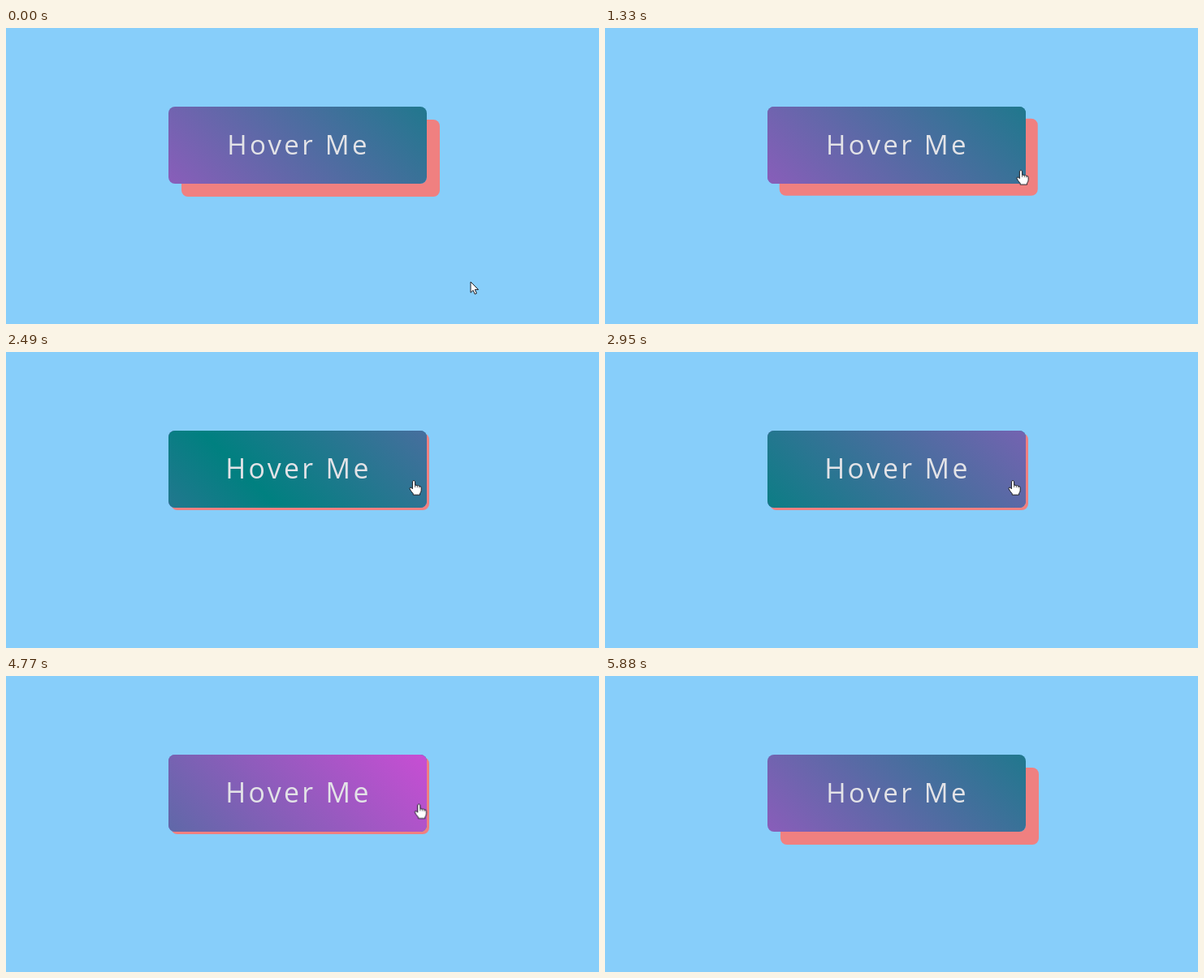
An HTML page for the animation above (7.03 s loop, 730 px wide and 365 px high).

```html
<!DOCTYPE html>
<html lang="en">
<head>
<meta charset="utf-8">
<title>Hover button</title>
<style>
  :root { --loop: 7.03s; }
  html, body { margin: 0; width: 100%; height: 100%; overflow: hidden; }
  body { position: relative; background: #87cefa; }

  .button {
    position: absolute; left: 200px; top: 97px; width: 318px; height: 95px;
    border-radius: 8px;
    animation: press var(--loop) infinite;
  }
  .button, .button::before {
    background: linear-gradient(45deg, #d24bd8, teal, #d24bd8) 0 0 / 400% 400%;
  }
  .button::before {
    content: ""; position: absolute; inset: 0; border-radius: inherit;
    animation: slide var(--loop) infinite, hovered var(--loop) step-end infinite;
  }
  .stage { position: absolute; left: 0; top: 0; width: 730px; height: 365px; }
  .label {
    font: 33px "Open Sans", "Noto Sans", sans-serif;
    letter-spacing: 3.3px; text-anchor: middle; fill: #e3e3e7;
    transform-origin: 359px 144px;
    animation: grow var(--loop) infinite;
  }
  .cursor {
    fill: #fff; stroke: #1c1c22; stroke-width: 1; stroke-linejoin: round;
    animation: move var(--loop) linear infinite;
  }
  .arrow { animation: arrow var(--loop) step-end infinite; }
  .hand { animation: hovered var(--loop) step-end infinite; }

  /* hover lasts from 1.28s to 4.8s */
  @keyframes hovered {
    0%, 68.28%, 100% { opacity: 0; }
    18.21% { opacity: 1; }
  }
  @keyframes arrow {
    0%, 68.28%, 100% { opacity: 1; }
    18.21%, 83.6% { opacity: 0; }
  }
  @keyframes press {
    0%, 18.21%, 75.39%, 100% { box-shadow: 16px 16px 0 #f08080; animation-timing-function: ease; }
    25.32%, 68.28% { box-shadow: 3px 3px 0 #f08080; animation-timing-function: ease; }
  }
  @keyframes grow {
    0%, 18.21%, 75.39%, 100% { transform: scale(1); animation-timing-function: ease; }
    25.32%, 68.28% { transform: scale(1.024); animation-timing-function: ease; }
  }
  @keyframes slide {
    0%, 18.21% { background-position: 0 0; animation-timing-function: ease; }
    85%, 100% { background-position: 100% 0; }
  }
  @keyframes move {
    0%, 11.66% { transform: translate(572px, 313px); animation-timing-function: ease-in-out; }
    18.92% { transform: translate(512px, 175px); animation-timing-function: ease-out; }
    21.34%, 65.43% { transform: translate(502px, 158px); }
    67.85% { transform: translate(508px, 157px); animation-timing-function: cubic-bezier(.3, .3, .5, 1); }
    74.25%, 82.36% { transform: translate(629px, 324px); }
    82.79%, 100% { transform: translate(649px, 335px); }
  }
</style>
</head>
<body>
  <div class="button"></div>
  <svg class="stage" viewBox="0 0 730 365">
    <text class="label" x="360" y="156">Hover Me</text>
    <g class="cursor">
      <path class="arrow" d="M0 0V13.3L3.1 10.4 5.2 15.2 7.4 14.2 5.3 9.6H9.5Z"/>
      <g class="hand">
        <path d="M-1.6 1.6Q0-.8 1.6 1.6V6.4Q3 5.6 4.3 6.8 5.8 6.2 6.9 7.5 9 7.2 9.2 9.4V12.5Q9 15 7.6 16.4V18.2H-.8V16.6Q-3.6 13.8-5 10.6-5.2 8.6-3 9.2L-1.6 10.8Z"/>
        <path d="M1.6 6.4V9M4.3 6.8V9.2M6.9 7.5V9.6" fill="none" stroke-width=".7"/>
      </g>
    </g>
  </svg>
</body>
</html>
```
